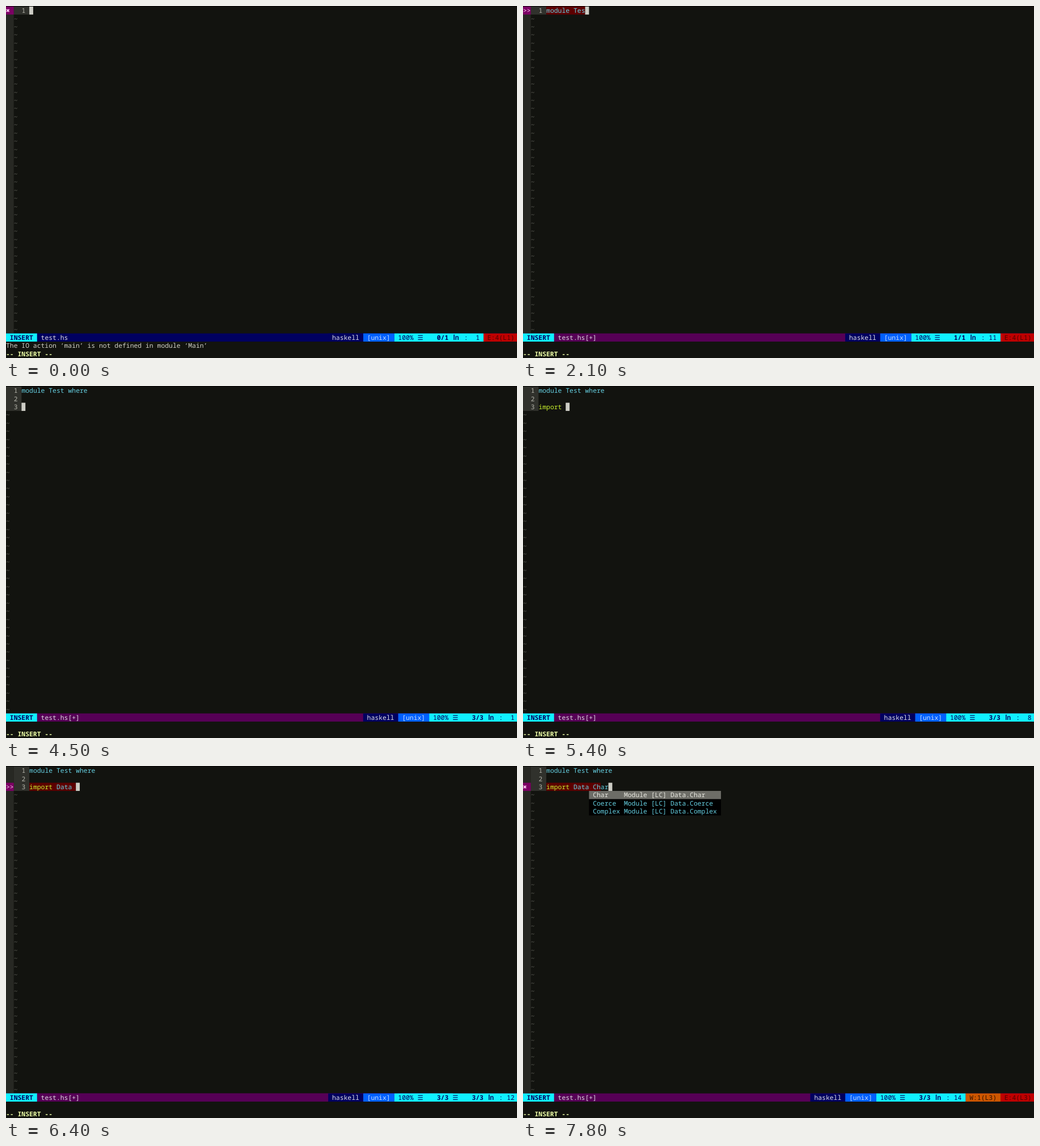
Animation of 901x622 px, one loop 8000 ms. Source, as an HTML page:

```html
<!DOCTYPE html>
<html lang="en">
<head>
<meta charset="utf-8">
<title>Editor session</title>
<style>
  html, body { margin: 0; width: 100%; height: 100%; overflow: hidden; background: #12130f; }
  svg { display: block; }
  text {
    font: 11.408px "Noto Sans Mono", "DejaVu Sans Mono", monospace;
    white-space: pre;
    text-rendering: geometricPrecision;
  }
  .bold { font-weight: 700; }
  .icon { font-family: "DejaVu Sans", sans-serif; }
  .sign { font-family: "DejaVu Sans Mono", monospace; }
  .log { font: 500 12.5px Roboto, sans-serif; }
</style>
</head>
<body>
<svg id="stage" width="901" height="622" viewBox="0 0 901 622"></svg>
<script>
const LOOP = 8000, CELL = 6.845, LINE = 14.447, TOP = 0.7;
const COLS = 132, STATUS_ROW = 40;
const C = {
  gutter: '#272823', numberBg: '#30312c', number: '#b4b4aa', tilde: '#5b5c55',
  text: '#f0f0e8', cyan: '#66d0e2', lime: '#c8f02c', dot: '#861010',
  red: '#5c0000', navy: '#00005f', plum: '#560056', sky: '#10efff', blue: '#0060ff',
  cursor: '#cdcdc5', signBg: '#7c0064', signText: '#ffc8f4',
  error: '#bf0000', errorText: '#520000', warn: '#cc5600', warnText: '#301000'
};

// Each entry changes the editor state from its time on.
const steps = [[0, {
  buffer: '', marks: [], gutter: true, sign: [0, '✖'], error: 'E:4(L1)', warn: '', modified: false,
  message: 'The IO action ‘main’ is not defined in module ‘Main’',
  mode: true, cursor: true, column: 0, popup: false, selected: false, partial: ''
}]];
const at = (time, change) => steps.push([time, change]);
const type = (prefix, chars, times) =>
  times.forEach((time, i) => at(time, { buffer: prefix + chars.slice(0, i + 1) }));
const red = (row, length) => [row, 0, length, C.red];

type('', 'modu', [500, 700, 900, 1100]);
at(500, { modified: true });
at(1300, { buffer: 'module', marks: [red(0, 3)], message: '', mode: false, cursor: false });
at(1400, { mode: true, cursor: true });
at(1600, { buffer: 'module ' });
at(1700, { error: '', sign: [0, '>>'] });
type('module ', 'Test', [1900, 2000, 2100, 2200]);
at(2100, { marks: [red(0, 13)], error: 'E:4(L1)' });
type('module Test', ' where', [2600, 2700, 2800, 2900, 3000, 3100]);
at(2800, { marks: [red(0, 13), [0, 13, 4, C.navy]], sign: [0, 'i'] });
at(3300, { buffer: 'module Test where\n', sign: [0, '✖'] });
at(3500, { sign: [0, '>>'] });
const head = 'module Test where\n\n';
at(3900, { buffer: head, error: 'E:3(L1)' });
at(4500, { marks: [], sign: null, gutter: false, error: '' });
type(head, 'import D', [4700, 4900, 5000, 5100, 5200, 5300, 5400, 5500]);
at(5600, { gutter: true, sign: [2, '✖'], marks: [red(2, 8)] });
type(head + 'import D', 'ata', [5700, 5800, 5900]);
at(5800, { marks: [red(2, 9)] });
at(6200, { marks: [red(2, 10)] });
at(6400, { buffer: head + 'import Data.', sign: [2, '>>'], marks: [red(2, 12)], column: 12, partial: 'E:3(L3)' });
at(6600, { error: 'E:3(L3)', column: 0, partial: '' });
at(6700, { sign: [2, '✖'] });
at(6800, { error: 'E:4(L3)', warn: 'W:1(L3)' });
at(7000, { buffer: head + 'import Data.C' });
at(7300, { popup: true, marks: [red(2, 13)] });
at(7400, { marks: [red(2, 14)] });
at(7800, { buffer: head + 'import Data.Char', column: 14, selected: true });
steps.sort((a, b) => a[0] - b[0]);

const yOf = row => TOP + row * LINE;
const rect = (col, row, cols, fill, rows = 1) =>
  `<rect x="${col * CELL}" y="${yOf(row)}" width="${cols * CELL}" height="${rows * LINE}" fill="${fill}"/>`;
const text = (col, row, str, fill, cls = '') =>
  `<text x="${col * CELL}" y="${yOf(row) + 11.4}" fill="${fill}" class="${cls}">${str.replace(/>/g, '&gt;')}</text>`;

function tokenColor(token) {
  if (token === 'import') return C.lime;
  if (token === '.') return C.dot;
  return /^(module|where|[A-Z]\w*)$/.test(token) ? C.cyan : C.text;
}

function codeLine(line, col, row) {
  return [...line.matchAll(/\w+|\./g)]
    .map(m => text(col + m.index, row, m[0], tokenColor(m[0]))).join('');
}

function statusBar(s, error, lines) {
  const row = STATUS_ROW;
  const last = lines[lines.length - 1];
  const position = `${s.buffer ? lines.length : 0}/${lines.length}`;
  const column = String(s.column || last.length + 1).padStart(2);
  let end = COLS, out = rect(0, row, COLS, s.modified ? C.plum : C.navy);
  const segment = (width, fill) => {
    end -= width;
    out += rect(end, row, width, fill);
  };
  const label = (str, fill, color) => {
    segment(str.length + 2, fill);
    out += text(end + 1, row, str, color);
  };

  if (error) label(error, C.error, C.errorText);
  if (s.warn) label(s.warn, C.warn, C.warnText);
  segment(23, C.sky);
  out += text(end + 1, row, '100%', C.navy)
    + text(end + 6, row, '☰', C.navy, 'icon')
    + text(end + 11, row, position, C.navy, 'bold')
    + text(end + 15.2, row, 'ln', C.navy, 'log')
    + text(end + 18, row, ': ' + column, C.navy);
  label('[unix]', C.blue, '#c6dcff');
  label('haskell', C.navy, '#dedee8');
  return out + rect(0, row, 8, C.sky) + text(1, row, 'INSERT', C.navy, 'bold')
    + text(9, row, 'test.hs' + (s.modified ? '[+]' : ''), '#e0dce4');
}

function popup(selected) {
  let out = rect(17, 3, 34, '#000', 3);
  if (selected) out += rect(17, 3, 34, '#6d6d67');
  ['Char', 'Coerce', 'Complex'].forEach((name, i) => {
    out += text(18, 3 + i, name.padEnd(8) + 'Module [LC] Data.' + name, selected && !i ? '#e8e8e0' : C.cyan);
  });
  return out;
}

function draw(s) {
  const lines = s.buffer.split('\n');
  const left = s.gutter ? 2 : 0, code = left + 4;
  let out = '<rect width="901" height="622" fill="#12130f"/>';
  if (s.gutter) out += rect(0, 0, 2, C.gutter, STATUS_ROW);
  out += rect(left, 0, 4, C.numberBg, lines.length);
  for (let row = lines.length; row < STATUS_ROW; row++) out += text(left, row, '~', C.tilde);

  if (s.sign) {
    const [row, glyph] = s.sign, info = glyph === 'i';
    out += rect(0, row, 2, info ? '#000' : C.signBg)
      + text(0, row, glyph, info ? '#fff' : C.signText, info ? 'sign bold' : glyph === '✖' ? 'sign' : '');
  }
  for (const [row, from, length, fill] of s.marks) {
    const visible = Math.min(length, lines[row].length - from);
    if (visible > 0) out += rect(code + from, row, visible, fill);
  }
  lines.forEach((line, row) => {
    out += text(left + 2, row, String(row + 1), C.number) + codeLine(line, code, row);
  });
  const lastRow = lines.length - 1;
  if (s.cursor) out += rect(code + lines[lastRow].length, lastRow, 1, C.cursor);
  if (s.popup) out += popup(s.selected);

  out += statusBar(s, s.error, lines);
  // A half-finished repaint shows the new bar only on the left.
  if (s.partial) {
    out += '<clipPath id="painted"><rect width="788" height="622"/></clipPath>'
      + `<g clip-path="url(#painted)">${statusBar(s, s.partial, lines)}</g>`;
  }
  out += text(0, 41, s.message, '#d0d0c8');
  if (s.mode) out += text(0, 42, '-- INSERT --', '#ecffa6', 'bold');
  return out + '<rect width="901" height="0.8" fill="#000"/>';
}

const stage = document.getElementById('stage');
const start = performance.now();
let shown = -1;

function render(now) {
  const time = Math.max(0, now - start) % LOOP;
  const past = steps.filter(step => step[0] <= time);
  if (past.length !== shown) {
    shown = past.length;
    stage.innerHTML = draw(Object.assign({}, ...past.map(step => step[1])));
  }
  requestAnimationFrame(render);
}
render(start);
</script>
</body>
</html>
```
